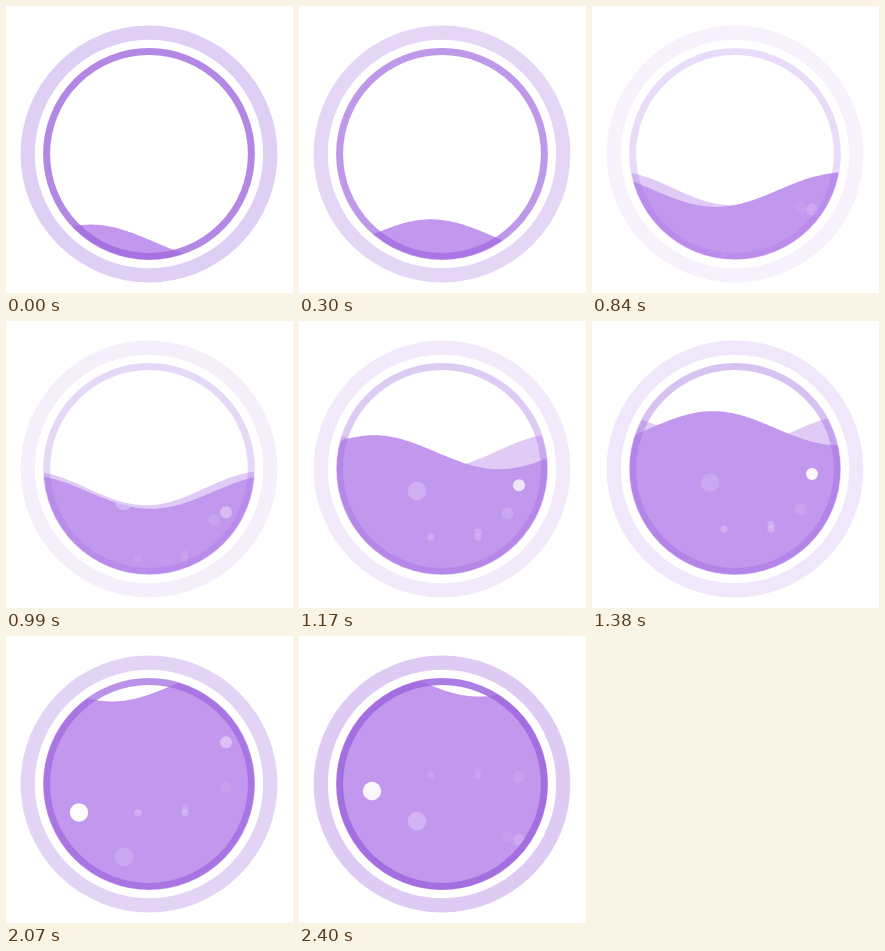
An HTML page with a canvas that plays this animation: 287x287 px, repeating every 2490 ms.

```html
<!DOCTYPE html>
<html lang="en">
<head>
<meta charset="utf-8">
<title>Filling bubble</title>
<style>
  html, body { margin: 0; width: 100%; height: 100%; overflow: hidden; background: #fff; }
  canvas { display: block; width: 287px; height: 287px; }
</style>
</head>
<body>
<canvas id="stage" width="287" height="287"></canvas>
<script>
const ctx = document.getElementById('stage').getContext('2d');
const SIZE = 287, CX = 143, CY = 148, TAU = Math.PI * 2;
const LOOP = 2490, BUBBLE_CYCLE = 1560;
const WATER = '#c297ee', RING = '#9f68df';

// Poses are held for 90 ms, a few of them for 60 ms.
const SHORT = [0, 4, 12, 15, 17, 19, 28];
const starts = [0];
for (let i = 0; i < 29; i++) starts.push(starts[i] + (SHORT.includes(i) ? 60 : 90));

// Time and x of the front wave's trough; it travels right and pauses near the top.
const TROUGH = [[0, -40], [840, 124], [1170, 200], [1710, 365], [2070, 356], [2400, 430]];

// Each bubble rises at its own speed, some of them in surges.
const BUBBLES = [
  { x: 118, r: 9.3, born: 270, y: 262, speed: 0.11, life: 1300, peak: 0.27, surge: 18 },
  { x: 73, r: 9.2, born: 1400, y: 220, speed: 0.065, life: 1600, peak: 1 },
  { x: 220, r: 6, born: 760, y: 215, speed: 0.092, life: 1500, peak: 1, surge: 13 },
  { x: 220, r: 6, born: 1800, y: 159, speed: 0.03, life: 1000, peak: 0.1 },
  { x: 208.5, r: 6, born: 740, y: 204, speed: 0.027, life: 800, peak: 0.15 },
  { x: 132, r: 3.6, born: 750, y: 259, speed: 0.071, life: 1900, peak: 0.28, surge: 13 },
  { x: 179, r: 3.6, born: 750, y: 259, speed: 0.071, life: 1900, peak: 0.28, surge: 13 },
  { x: 179, r: 3.6, born: 750, y: 254, speed: 0.071, life: 1650, peak: 0.25, surge: 13 }
];

const mix = (a, b, s) => a + (b - a) * s;
const ease = s => s * s * (3 - 2 * s);

function along(points, t) {
  const i = Math.max(1, points.findIndex(p => p[0] >= t));
  const [t0, a] = points[i - 1], [t1, b] = points[i];
  return mix(a, b, (t - t0) / (t1 - t0));
}

const waterLevel = t => 240 - 199 / (1 + Math.exp(-0.0034 * (t - 1115)));

// The back wave swells up beside the front one while the water rises fastest.
const backDrop = t => 30 - 34 * Math.exp(-(((t - 1000) / 600) ** 2));

const ringAlpha = t => t < 840
  ? mix(0.79, 0.23, ease(t / 840))
  : mix(0.23, 0.86, ((t - 840) / 1560) ** 1.1);

function disc(x, y, r) {
  ctx.beginPath();
  ctx.arc(x, y, r, 0, TAU);
}

function wave(level, trough, length) {
  ctx.beginPath();
  ctx.moveTo(30, SIZE);
  for (let x = 30; x <= 256; x += 2) {
    ctx.lineTo(x, level + 17 * Math.cos(TAU * (x - trough) / length));
  }
  ctx.lineTo(256, SIZE);
}

function bubble({ x, r, born, y, speed, life, peak, surge = 0 }, t) {
  const age = t - born;
  if (age < 0 || age > life) return;
  ctx.globalAlpha = peak * Math.sin(Math.PI * age / life);
  disc(x, y - speed * age - surge * Math.sin(TAU * age / 1600), r);
  ctx.fill();
}

function ring(r, width, alpha) {
  ctx.globalAlpha = alpha;
  ctx.strokeStyle = RING;
  ctx.lineWidth = width;
  disc(CX, CY, r);
  ctx.stroke();
}

function draw(t) {
  const level = waterLevel(t);
  ctx.clearRect(0, 0, SIZE, SIZE);

  ctx.save();
  disc(CX, CY, 105.2);
  ctx.clip();
  ctx.fillStyle = WATER;
  ctx.globalAlpha = 0.5;
  wave(level + backDrop(t), 140, 235);
  ctx.fill();
  ctx.globalAlpha = 1;
  wave(level, along(TROUGH, t), 250);
  ctx.fill();

  ctx.clip();
  ctx.fillStyle = '#fff';
  for (const b of BUBBLES) {
    bubble(b, t);
    bubble(b, t - BUBBLE_CYCLE);
  }
  ctx.restore();

  const alpha = ringAlpha(t);
  ring(102.4, 7, alpha);
  ring(121.3, 14.2, alpha * 0.4);
}

const origin = performance.now();
function tick() {
  const t = (performance.now() - origin) % LOOP;
  draw(starts.filter(s => s <= t).pop() || 0);
  requestAnimationFrame(tick);
}
tick();
</script>
</body>
</html>
```
